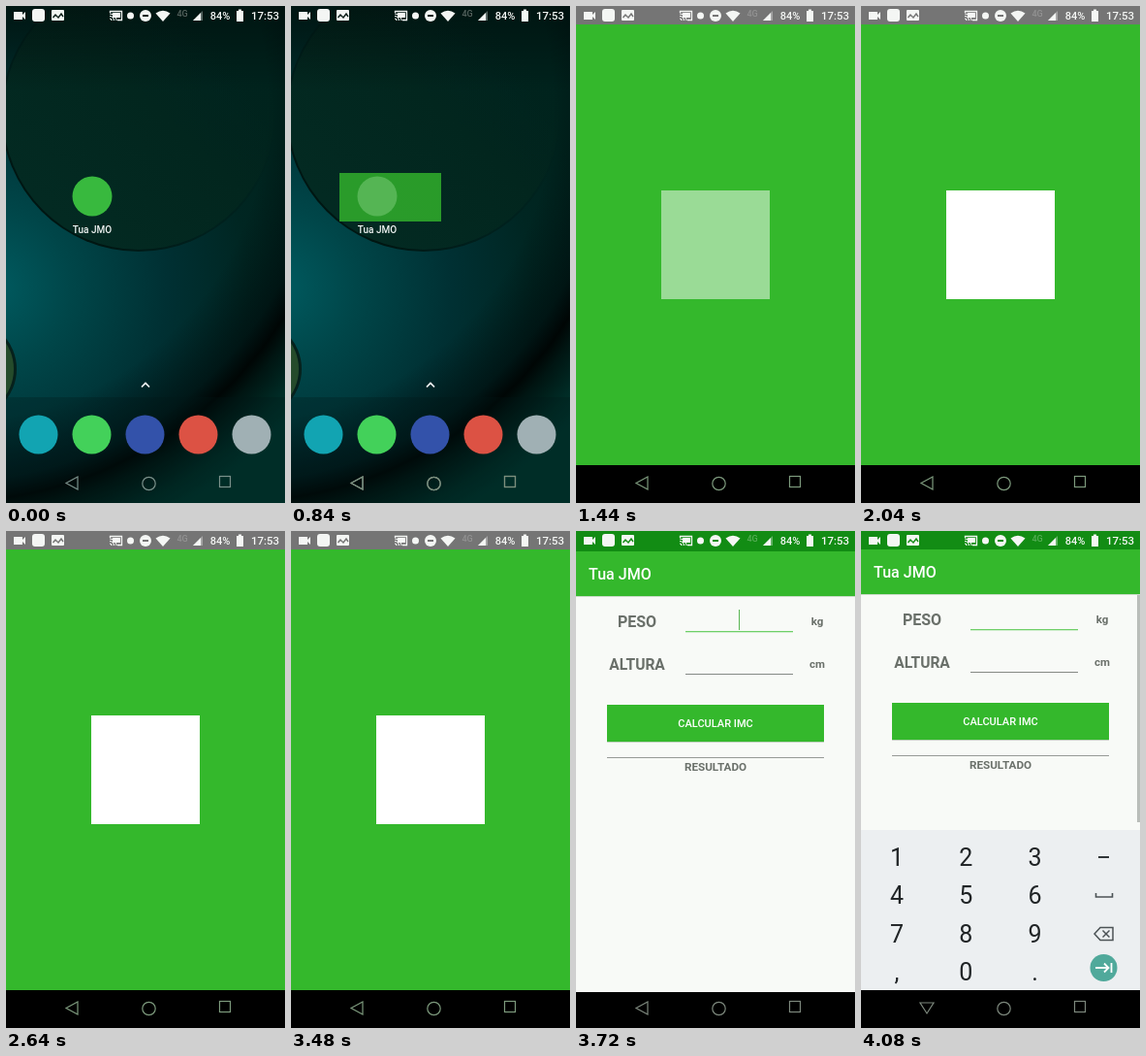
These frames come from a looping animation (288 by 512 pixels, 4200 ms). An HTML page with a canvas:

```html
<!DOCTYPE html>
<html lang="pt">
<head>
<meta charset="utf-8">
<title>Tua JMO</title>
<style>
html, body { margin: 0; width: 100%; height: 100%; overflow: hidden; background: #000; }
canvas { display: block; width: 288px; height: 512px; }
</style>
</head>
<body>
<canvas id="stage" width="288" height="512"></canvas>
<script>
const ctx = document.getElementById('stage').getContext('2d');
const W = 288, H = 512, LOOP = 4200, STEP = 120;
const STATUS_H = 19, NAV_Y = 473;
const GREEN = '#34b82c', PAPER = '#f8faf7', APP_NAME = 'Tua JMO';

const clamp = v => Math.max(0, Math.min(1, v));
const mix = (a, b, p) => a + (b - a) * p;
const easeOut = p => 1 - (1 - clamp(p)) ** 3;

function rect(x, y, w, h, fill) {
  ctx.fillStyle = fill;
  ctx.fillRect(x, y, w, h);
}

function disc(x, y, r, fill) {
  ctx.fillStyle = fill;
  ctx.beginPath();
  ctx.arc(x, y, r, 0, Math.PI * 2);
  ctx.fill();
}

function roundRect(x, y, w, h, r, fill) {
  ctx.fillStyle = fill;
  ctx.beginPath();
  ctx.roundRect(x, y, w, h, r);
  ctx.fill();
}

function trace(points, close) {
  ctx.beginPath();
  points.forEach(([x, y], i) => i ? ctx.lineTo(x, y) : ctx.moveTo(x, y));
  if (close) ctx.closePath();
}

function polygon(points, fill) {
  trace(points, true);
  ctx.fillStyle = fill;
  ctx.fill();
}

function stroke(points, color, width, close = false) {
  trace(points, close);
  ctx.strokeStyle = color;
  ctx.lineWidth = width;
  ctx.stroke();
}

function text(str, x, y, size, color, weight = 400, align = 'center') {
  ctx.font = `${weight} ${size}px Roboto, sans-serif`;
  ctx.textAlign = align;
  ctx.textBaseline = 'alphabetic';
  ctx.fillStyle = color;
  ctx.fillText(str, x, y);
}

function addStops(gradient, stops) {
  stops.forEach(([at, color]) => gradient.addColorStop(at, color));
  return gradient;
}

const radial = (x, y, r0, r1, stops) =>
  addStops(ctx.createRadialGradient(x, y, r0, x, y, r1), stops);
const linear = (x0, y0, x1, y1, stops) =>
  addStops(ctx.createLinearGradient(x0, y0, x1, y1), stops);

function faded(alpha, draw) {
  ctx.save();
  ctx.globalAlpha = alpha;
  draw();
  ctx.restore();
}

function wallpaper() {
  rect(0, 0, W, H, radial(-15, 290, 0, 330, [
    [0, '#005b60'], [0.25, '#004649'], [0.55, '#003033'], [0.8, '#002622'], [1, '#00231d']
  ]));
  // The disc melts into the backdrop towards its upper right.
  disc(137, 111, 142, linear(90, 240, 230, 80, [[0, '#001612'], [1, 'rgba(0,32,26,0)']]));
  disc(137, 111, 140, linear(80, 240, 250, 60, [[0, '#032a22'], [0.6, '#02261e'], [1, 'rgba(2,36,29,0)']]));
  rect(0, 0, W, H, radial(-60, 100, 330, 480, [
    [0, 'rgba(0,6,8,0)'], [0.4, 'rgba(0,6,8,0.5)'], [0.54, '#000605'],
    [0.64, '#001512'], [0.85, '#002c26'], [1, '#00362e']
  ]));
  disc(-40, 374, 51, '#06211c');
  disc(-41, 374, 49, '#254b2b');
  rect(0, 0, W, 90, linear(0, 0, 0, 90, [[0, 'rgba(0,0,0,0.4)'], [1, 'rgba(0,0,0,0)']]));
}

function statusBar(signalColor, cut) {
  const white = '#f4f6f4';
  rect(8, 6, 9, 8, white);
  polygon([[16, 10], [20, 6], [20, 14]], white);
  roundRect(27, 3, 13, 13, 3, white);
  roundRect(47, 4, 13, 11, 1, white);
  stroke([[48.5, 12], [51, 9], [54, 12], [57, 8], [59, 11]], cut, 1.4);

  stroke([[107.5, 7], [107.5, 5.5], [119.5, 5.5], [119.5, 14.5], [115, 14.5]], white, 1.3);
  rect(110, 7, 8, 5, white);
  ctx.strokeStyle = white;
  ctx.lineWidth = 1.2;
  for (const r of [2, 4.5, 7]) {
    ctx.beginPath();
    ctx.arc(107, 15, r, -Math.PI / 2, 0);
    ctx.stroke();
  }
  disc(128.5, 10, 3.5, white);
  disc(144, 10, 6, white);
  rect(141, 9, 6, 2, cut);
  ctx.fillStyle = white;
  ctx.beginPath();
  ctx.moveTo(162, 16);
  ctx.lineTo(154.5, 7.5);
  ctx.quadraticCurveTo(162, 2, 169.5, 7.5);
  ctx.fill();
  text('4G', 182, 10.5, 9, signalColor, 500);
  polygon([[193, 15], [203, 5], [203, 15]], 'rgba(255,255,255,.35)');
  polygon([[193, 15], [201, 7], [201, 15]], white);
  text('84%', 221, 14, 11, white, 500);
  rect(238, 5, 7, 11, white);
  rect(240, 3.5, 3, 2, white);
  text('17:53', 267.5, 14, 11.5, white, 500);
}

function navIcons(color, keyboardOpen) {
  const back = keyboardOpen
    ? [[61, 486], [75, 486], [68, 497]]
    : [[62, 491.5], [74, 485], [74, 498]];
  stroke(back, color, 1.2, true);
  ctx.beginPath();
  ctx.arc(147.5, 492, 6.7, 0, Math.PI * 2);
  ctx.stroke();
  ctx.strokeRect(220.5, 484.5, 11, 11);
}

function home(launching) {
  wallpaper();
  rect(0, 403, W, H - 403, 'rgba(0,24,24,.28)');
  statusBar('#56645f', '#0c1f1a');
  if (!launching) disc(89, 196, 20.5, '#38b93e');
  text(APP_NAME, 89, 233.5, 10, '#f0f4f2', 500);
  stroke([[140, 392.5], [144, 388.5], [148, 392.5]], '#fff', 1.7);
  ['#12a4b2', '#43d15a', '#3352aa', '#dc5244', '#a0b0b4']
    .forEach((color, i) => disc(33.5 + 55 * i, 441.5, 20, color));
  navIcons('#7b918b');
}

function launch(t) {
  const p = easeOut((t - 840) / 360);
  const x = mix(50, 0, p), y = mix(172, STATUS_H, p);
  const right = mix(155, W, p), bottom = mix(222, NAV_Y, p);
  faded(p, () => rect(0, NAV_Y, W, H - NAV_Y, '#000'));
  faded(mix(0.8, 1, p), () => rect(x, y, right - x, bottom - y, GREEN));
  faded(1 - p, () => disc(89, 196, 20.5, '#55b554'));
  navIcons('#7d8f7d');
}

function splash(t) {
  rect(0, 0, W, STATUS_H, '#757575');
  rect(0, STATUS_H, W, NAV_Y - STATUS_H, GREEN);
  rect(0, NAV_Y, W, H - NAV_Y, '#000');
  statusBar('#929292', '#757575');
  if (t >= 1440) {
    faded(clamp(0.5 + (t - 1440) / 720), () => rect(88, 190, 112, 112, '#fff'));
  }
  navIcons('#7d9a7d');
}

function form(cursor) {
  const ink = '#6a706a';
  rect(0, STATUS_H, W, H - STATUS_H, PAPER);
  rect(0, STATUS_H, W, 46, GREEN);
  rect(0, 65, W, 1, '#cbdcc9');
  text(APP_NAME, 13, 48, 16, '#fff', 500, 'left');
  text('PESO', 63, 96.5, 16, ink, 700);
  text('ALTURA', 63, 140.5, 15.6, ink, 700);
  text('kg', 249, 94.5, 11.5, ink, 700);
  text('cm', 249, 139, 11.5, ink, 700);
  rect(113, 101, 111, 1.3, '#6fcf68');
  rect(113, 145, 111, 1, '#858985');
  if (cursor) rect(168, 79, 1, 21, '#59b653');
  rect(32, 215, 224, 1, '#c4d2c2');
  rect(32, 177, 224, 38, GREEN);
  text('CALCULAR IMC', 144, 200, 11, '#fff', 500);
  rect(32, 231, 224, 1, '#969a96');
  text('RESULTADO', 144, 244.5, 11.7, ink, 700);
}

function keyboard(offset) {
  ctx.save();
  ctx.translate(0, offset);
  rect(0, 308, W, NAV_Y - 308, '#eceff1');
  ['123', '456', '789', ',0.'].forEach((row, r) =>
    [...row].forEach((key, c) => text(key, 37 + 71.3 * c, 344.5 + 39.6 * r, 25, '#202426')));
  rect(245, 335, 11, 2, '#303638');
  stroke([[242.5, 373], [242.5, 377], [259.5, 377], [259.5, 373]], '#4c5356', 1.6);
  stroke([[241, 415], [247, 408.5], [260, 408.5], [260, 421.5], [247, 421.5]], '#4c5356', 1.5, true);
  stroke([[249.5, 411.5], [256.5, 418.5]], '#4c5356', 1.5);
  stroke([[256.5, 411.5], [249.5, 418.5]], '#4c5356', 1.5);
  disc(250.5, 450, 14, '#50a99b');
  stroke([[242, 450], [255, 450]], '#fff', 1.8);
  stroke([[251, 445.5], [255.5, 450], [251, 454.5]], '#fff', 1.8);
  stroke([[258.5, 445], [258.5, 455]], '#fff', 1.8);
  ctx.restore();
}

function formScreen(t) {
  const enter = easeOut((t - 3510) / 360);
  const slide = Math.round(mix(28, 0, enter));
  const keys = easeOut((t - 3880) / 200);
  faded(clamp((t - 3510) / 210), () => {
    rect(0, 0, W, STATUS_H + 3, '#128c14');
    ctx.translate(0, slide);
    form(t < 3960);
  });
  if (keys > 0) {
    keyboard((1 - keys) * 166);
    faded(keys, () => rect(285, 66, 3, 234, '#b9bdb9'));
  }
  const navTop = NAV_Y + Math.min(slide, 3);
  rect(0, navTop, W, H - navTop, '#000');
  statusBar('#55ad55', '#128c14');
  navIcons('#7d887d', keys > 0);
}

function render(now) {
  const t = Math.floor(now % LOOP / STEP) * STEP;
  if (t < 1200) {
    home(t >= 840);
    if (t >= 840) launch(t);
  } else {
    if (t < 3720) splash(t);
    if (t >= 3600) formScreen(t);
  }
}

const start = performance.now();
function tick() {
  render(performance.now() - start);
  requestAnimationFrame(tick);
}
tick();
</script>
</body>
</html>
```
